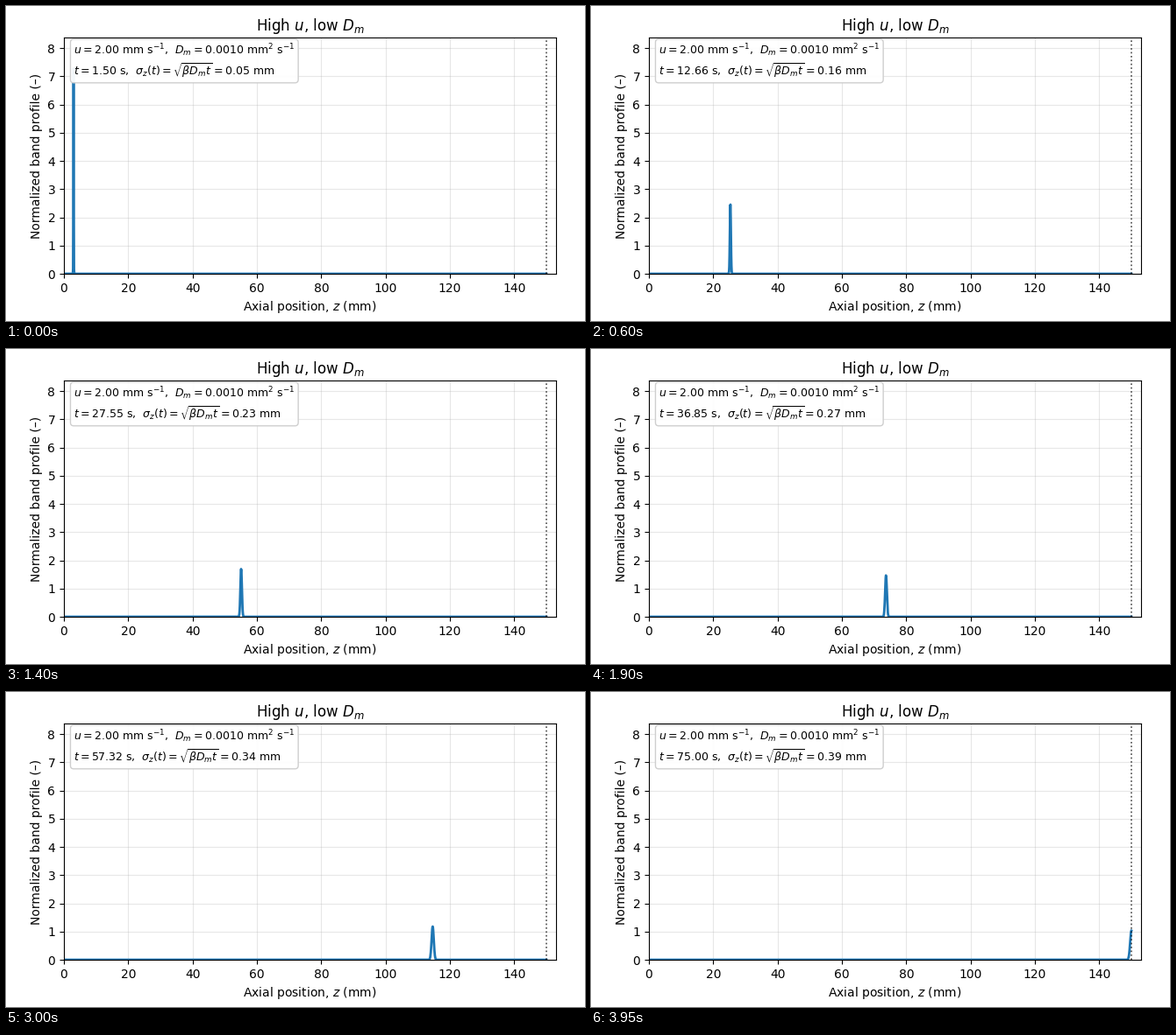
Recreate the animation shown at these times as a matplotlib script. Size 660 by 360 pixels, loop 4000 ms.

```python
import numpy as np
import matplotlib.pyplot as plt
from matplotlib.animation import FuncAnimation

# Band moving along a column while it spreads by diffusion
U = 2.0          # mm/s
D_M = 0.001      # mm^2/s
BETA = 2.0
LENGTH = 150.0   # mm
FRAMES = 80
INTERVAL = 50    # ms

z = np.linspace(0, LENGTH, 2000)
times = np.linspace(0.02, 1.0, FRAMES) * LENGTH / U


def sigma(t):
    return np.sqrt(BETA * D_M * t)


def profile(t):
    s = sigma(t)
    return np.exp(-0.5 * ((z - U * t) / s) ** 2) / (s * np.sqrt(2 * np.pi))


def label(t):
    return (
        rf"$u={U:.2f}\ \mathrm{{mm\ s^{{-1}}}}$,  "
        rf"$D_m={D_M:.4f}\ \mathrm{{mm^2\ s^{{-1}}}}$" "\n"
        rf"$t={t:.2f}\ \mathrm{{s}}$,  "
        rf"$\sigma_z(t)=\sqrt{{\beta D_m t}}={sigma(t):.2f}\ \mathrm{{mm}}$"
    )


fig, ax = plt.subplots(figsize=(6.6, 3.6), dpi=100)
fig.subplots_adjust(left=0.10, right=0.95, bottom=0.15, top=0.90)

line, = ax.plot(z, profile(times[0]), color="tab:blue", lw=2)
ax.axvline(LENGTH, color="k", ls=":", lw=1.2, alpha=0.7)

ax.set_xlim(0, 1.02 * LENGTH)
ax.set_ylim(0, 1.15 * profile(times[0]).max())
ax.set_xlabel(r"Axial position, $z$ (mm)")
ax.set_ylabel("Normalized band profile (–)")
ax.set_title(r"High $u$, low $D_m$")
ax.grid(True, alpha=0.3)

info = ax.text(
    0.02, 0.98, label(times[0]), transform=ax.transAxes,
    ha="left", va="top", fontsize=9,
    bbox=dict(boxstyle="round,pad=0.3", fc="white", ec="0.8", alpha=0.95),
)


def update(i):
    t = times[i]
    line.set_ydata(profile(t))
    info.set_text(label(t))
    return line, info


anim = FuncAnimation(fig, update, frames=FRAMES, interval=INTERVAL,
                     repeat=True, repeat_delay=0)
plt.show()
```
